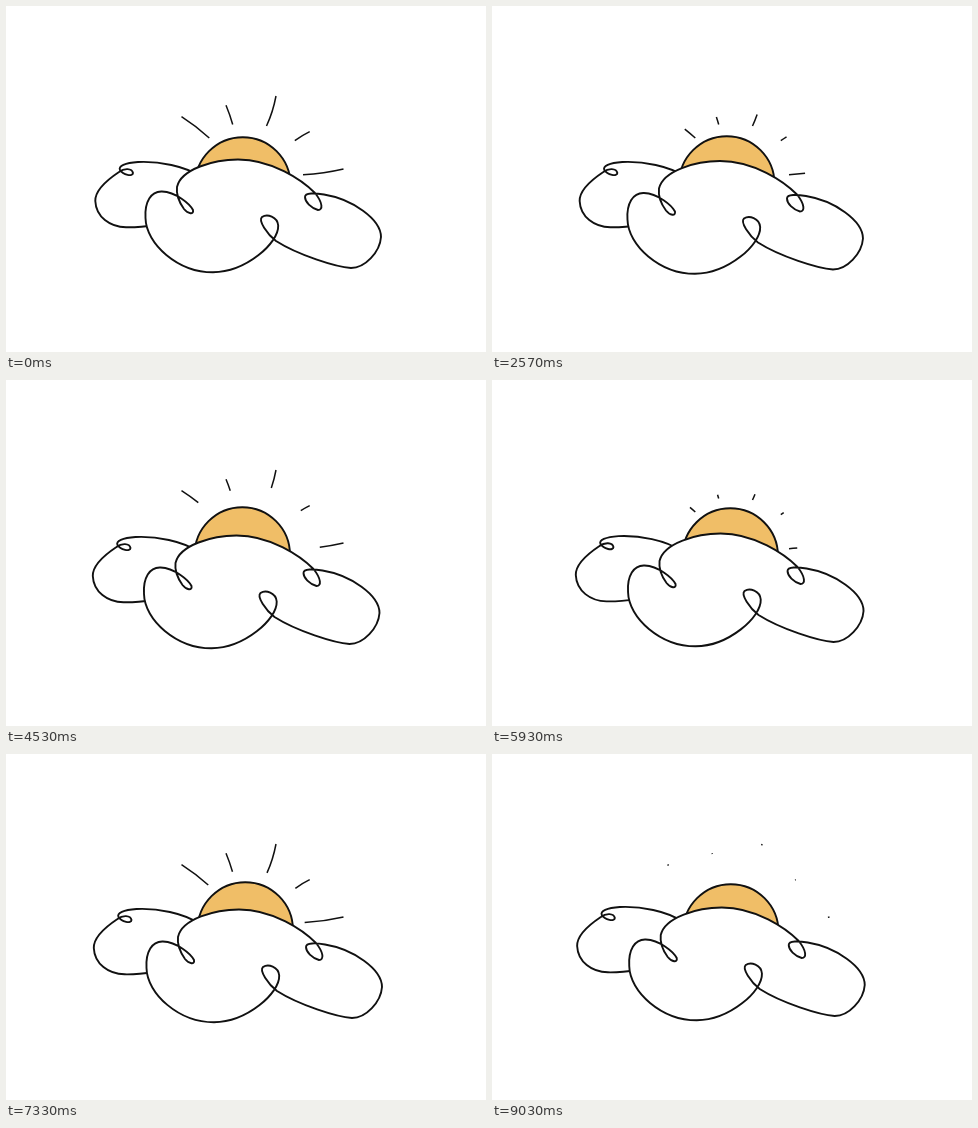
Recreate the animation shown at these times as an HTML page. Size 480 by 346 pixels, loop 9060 ms.

```html
<!DOCTYPE html>
<html lang="en">
<head>
<meta charset="utf-8">
<title>Sun behind clouds</title>
<style>
  html, body { margin: 0; width: 100%; height: 100%; overflow: hidden; background: #fff; }
  svg { display: block; width: 100%; height: 100%; }
  .line { fill: none; stroke: #111; stroke-width: 1.9; stroke-linejoin: round; }
  #front { fill: #fff; }
  #sun { fill: #f0be67; }
  .rays path {
    fill: none; stroke: #111; stroke-width: 1.5;
    stroke-dasharray: 1 1;
    animation: shine 9060ms linear infinite;
  }
  /* Even offsets show the whole ray, odd ones hide it. */
  @keyframes shine {
    0% { stroke-dashoffset: 0; }
    19.7% { stroke-dashoffset: -1; }
    41.8% { stroke-dashoffset: -2; }
    61.8% { stroke-dashoffset: -3; }
    80.1% { stroke-dashoffset: -4; }
    100% { stroke-dashoffset: -4.975; }
  }
</style>
</head>
<body>
<svg viewBox="0 0 480 346">
  <g class="rays">
    <path pathLength="1" d="M203.3 132Q190 120 175.5 110.7"/>
    <path pathLength="1" d="M226.7 118.5Q224 109 220 99.3"/>
    <path pathLength="1" d="M260.5 120Q267 106 270 90"/>
    <path pathLength="1" d="M288.8 134.7Q296 129.5 303.7 125.7"/>
    <path pathLength="1" d="M297 168.7Q318 167.5 337.5 163"/>
  </g>
  <path id="back" class="line" d="M195 171C180 160 152 155 132 156C119 157 112 160 114 164
    C117 169 127 171 127 167C126 162 118 162 113 166C104 172 89 183 89.3 195
    C90 211 104 221 120 221.3C130 221.5 140 220.5 150 219"/>
  <circle id="sun" class="line" cx="236.8" cy="178.9" r="47.7"/>
  <path id="front" class="line" d="M139.5 212C138.5 196 145 185 156 185.5C170 186 184 198 187 204
    C188 209 182 208 178 203C173 196 170 189 171 181C175 163 208 153.5 232 153.5
    C266 153.5 296 174 309 187C317 197 317 204 312 204C305 202 299 196 299 191
    C299 186.5 309 187 318 188.5C346 193 375 213 375 231C374 246 359 262 345 262
    C330 261 292 249 270 235C261 228 252 214.5 256 211C261 207.5 271.5 210.5 272.2 219.5
    C273 237 240 266 207 266.3C172 266.3 140 238 139.5 212Z"/>
</svg>
<script>
  const LOOP = 9060;

  // Offsets at evenly spaced moments of the loop
  const drift = {
    back: { x: [0, -7.3, .3, -2.5, -5.5, -1.2, -4.2], y: [0, 1, -.3, 1, 0, -1.2, -3] },
    front: { x: [0, -5.3, -3.2, -1.5, -3.4, 1.3, -2.3], y: [0, 2.1, 1.3, 2, 0, 2.1, 0] },
    sun: { x: [0, 2, -3.2, -.5, 1.6, 2.5, 2], y: [0, -1.1, -1.2, -4, -2.9, -2.9, -1] }
  };

  // Catmull-Rom curve through the points, progress from 0 to 1
  function curve(points, progress) {
    const last = points.length - 1;
    const at = progress * last;
    const i = Math.floor(at), u = at - i;
    const [a, b, c, d] = [i - 1, i, i + 1, i + 2].map(n => points[Math.min(Math.max(n, 0), last)]);
    return b + u / 2 * (c - a + u * (2 * a - 5 * b + 4 * c - d + u * (3 * (b - c) + d - a)));
  }

  const start = performance.now();

  function draw() {
    const progress = Math.max(0, performance.now() - start) % LOOP / LOOP;
    for (const id in drift) {
      const { x, y } = drift[id];
      document.getElementById(id)
        .setAttribute('transform', `translate(${curve(x, progress)} ${curve(y, progress)})`);
    }
    requestAnimationFrame(draw);
  }
  draw();
</script>
</body>
</html>
```
